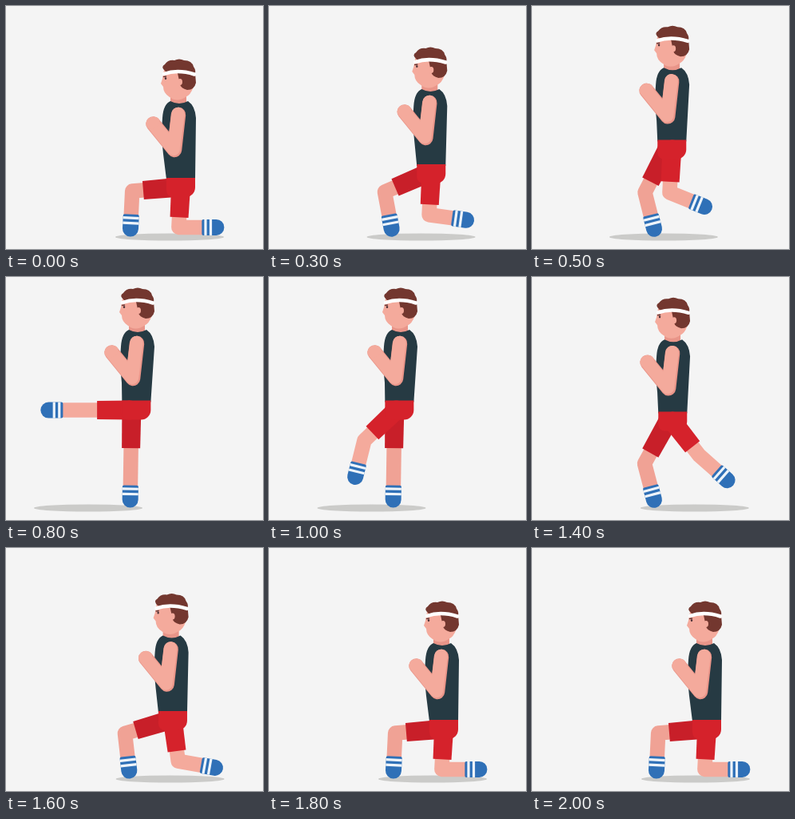
Write an HTML page with a canvas that moves like this. It is 322x304 px and loops after 2.1 s.

```html
<!DOCTYPE html>
<html lang="en">
<head>
<meta charset="utf-8">
<title>Lunge with front kick</title>
<style>
html, body { margin: 0; width: 322px; height: 304px; overflow: hidden; background: #f4f4f4; }
canvas { display: block; }
</style>
</head>
<body>
<canvas id="stage" width="322" height="304"></canvas>
<script>
const c = document.getElementById('stage').getContext('2d');
const STEP = 100, STEPS = 21;
const SKIN = '#f4aa9c', SHADE = '#e99589', FAR_SKIN = '#f0a295',
      RED = '#d5222b', FAR_RED = '#c81f29', NAVY = '#263a43', HAIR = '#73372f', BLUE = '#2f70b7';
const STANDING_FOOT = [155.5, 288.5];

const mix = (a, b, u) => a + (b - a) * u;
const between = (a, b, u) => a.map((v, i) => mix(v, b[i], u));

function smooth(from, to, t) {
  const u = Math.min(1, Math.max(0, (t - from) / (to - from)));
  return u * u * (3 - 2 * u);
}

// Rises over one span and falls over another
const pulse = (t, a, b, d, e) => smooth(a, b, t) - smooth(d, e, t);

function ellipse(color, x, y, rx, ry, turn = 0) {
  c.beginPath();
  c.ellipse(x, y, rx, ry, turn, 0, 7);
  c.fillStyle = color;
  c.fill();
}

function box(color, x, y, w, h, r = 0) {
  c.beginPath();
  c.roundRect(x, y, w, h, r);
  c.fillStyle = color;
  c.fill();
}

function fill(color, path) {
  c.fillStyle = color;
  c.fill(new Path2D(path));
}

function line(color, width, ...points) {
  c.beginPath();
  points.forEach(p => c.lineTo(...p));
  c.lineWidth = width;
  c.strokeStyle = color;
  c.stroke();
}

// Point at a distance along an angle from straight down, positive to the left
function reach([x, y], length, degrees) {
  const a = degrees * Math.PI / 180;
  return [x - Math.sin(a) * length, y + Math.cos(a) * length];
}

// Knee of a two-bone leg that bends forward between hip and foot
function bend(hip, foot, thigh, shank) {
  const dx = foot[0] - hip[0], dy = foot[1] - hip[1], d = Math.hypot(dx, dy);
  const run = (d * d + thigh * thigh - shank * shank) / (2 * d);
  const out = Math.sqrt(Math.max(0, thigh * thigh - run * run));
  return [hip[0] + (dx * run - dy * out) / d, hip[1] + (dy * run + dx * out) / d];
}

// Runs draw with the origin at b and the y axis pointing from a to b
function along(a, b, draw) {
  const dx = b[0] - a[0], dy = b[1] - a[1];
  c.save();
  c.translate(...b);
  c.rotate(Math.atan2(-dx, dy));
  draw(Math.hypot(dx, dy));
  c.restore();
}

function leg(hip, knee, tip, skin, cloth) {
  line(skin, 18.5, between(hip, knee, .6), knee, between(knee, tip, .6));
  along(knee, tip, () => {
    box(BLUE, -10, -28, 20, 28, [2, 2, 10, 10]);
    box('#eef4fa', -10, -25, 20, 3.2);
    box('#eef4fa', -10, -18.5, 20, 3.2);
  });
  along(hip, between(hip, knee, .75), length => {
    fill(cloth, `M-12 ${-length}H12L11.5 0H-11.5Z`);
    ellipse(cloth, 0, -length, 12, 12);
  });
}

function upperBody(waistX, waistY) {
  // Neck and vest
  box(SHADE, 206, 106, 20, 22, 5);
  fill(NAVY, `M206 119Q217 125 228 119Q237 125 238 140L${waistX + 18} ${waistY + 2}h-36
    L197 185Q194 160 196 140Q197 123 206 119Z`);
  // Face, hair and headband
  fill(SKIN, 'M198 80H236Q238 108 225 114Q214 121 205 114Q197 109 197 101L194 97L196 91Z');
  fill(HAIR, `M200 82Q193 76 199 73Q203 67 211 68Q217 65 223 68Q233 68 235 76Q238 80 237 84
    L238 96Q236 105 227 105Q219 103 218 98L215 84Z`);
  ellipse(SKIN, 218, 95, 3, 4);
  c.lineWidth = 4.5;
  c.strokeStyle = '#fff';
  c.stroke(new Path2D('M198 85Q215 79 236 85.5'));
  line('#6b3a38', 1.5, [197.5, 88.5], [200.5, 88]);
  ellipse('#4a3035', 200, 90.5, 1.2, 1.6);
  // Near arm
  line(SHADE, 18.5, [216, 136], [211, 180], [184.5, 147.5]);
  line(SKIN, 16.5, [215.5, 135], [210, 179], [184, 147]);
  ellipse(SKIN, 184, 146, 9, 7, -.4);
}

function draw(step) {
  const rise = pulse(step, 1, 6.7, 12.5, 17.3);
  const kick = pulse(step, 5, 6.2, 8, 12);
  const back = pulse(step, 12, 14, 14, 17);

  const dx = -52 * rise, dy = -53 * rise;
  const x = 219 + dx * 1.07, y = 215 + dy * 1.14;
  const hip = [x - 8 * kick, y + 12];
  const knee = reach(hip, 50 + 5 * rise, mix(3 - 41 * back, 90, kick));
  const tip = reach(knee, 57, mix(28 * rise + 20 * back - 90, 90, kick));
  const farHip = [x - 6, y + 12];

  c.clearRect(0, 0, 322, 304);
  c.lineCap = c.lineJoin = 'round';
  ellipse('#cbcbc9', 205 - 51 * (rise + kick) + 38 * back, 289, 68, 4.5);
  leg(farHip, bend(farHip, STANDING_FOOT, 55 + 7 * rise, 57), STANDING_FOOT, FAR_SKIN, FAR_RED);
  c.save();
  c.translate(dx, dy);
  upperBody(x - dx, y - dy);
  c.restore();
  leg(hip, knee, tip, SKIN, RED);
  box(RED, x - 18, y, 36, 24, [0, 0, 12, 8]);
}

function tick() {
  draw(Math.floor(performance.now() / STEP) % STEPS);
  requestAnimationFrame(tick);
}
tick();
</script>
</body>
</html>
```
